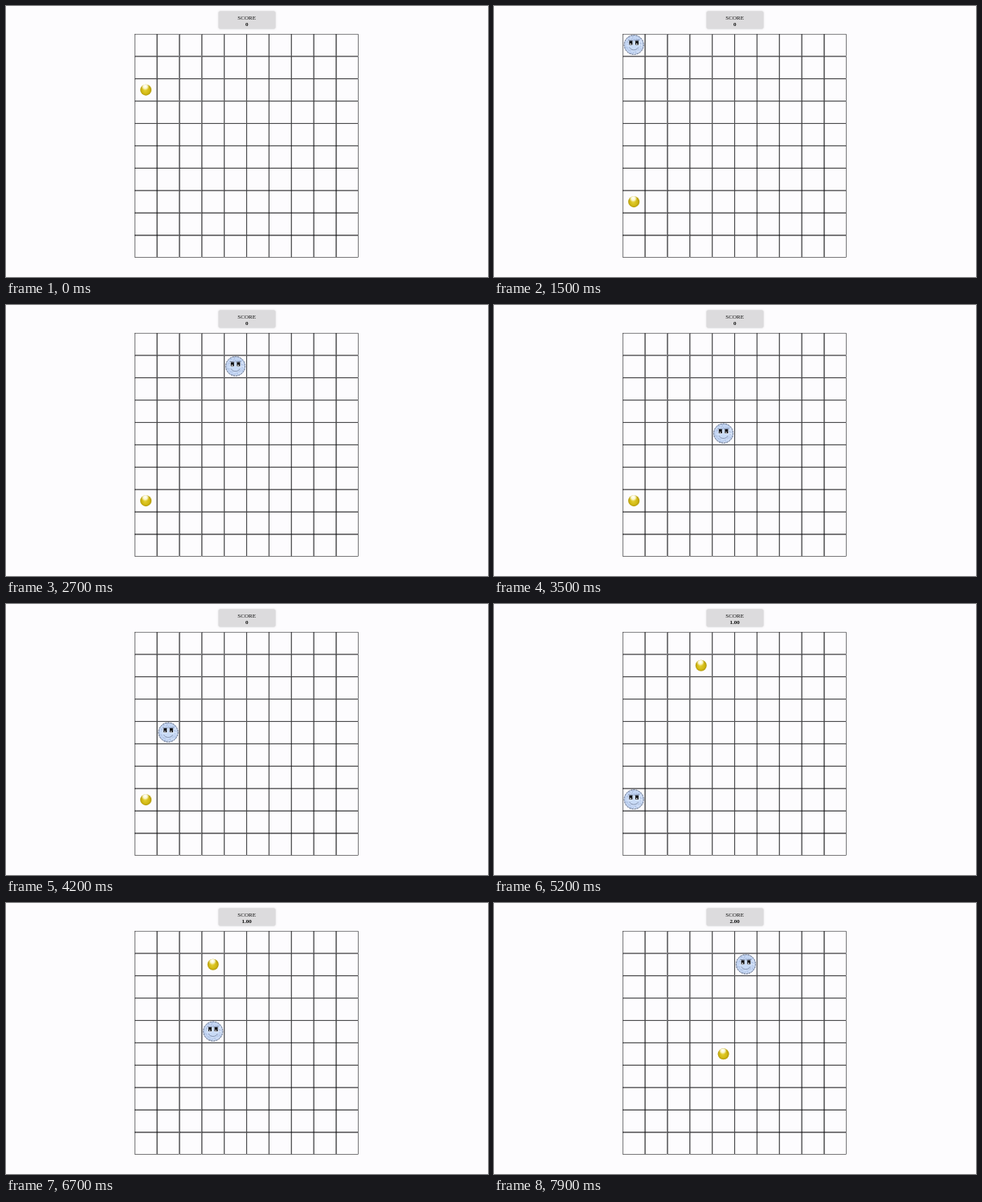
Animation of 600 by 338 pixels, one loop 8000 ms. Source, as an HTML page with a canvas:

```html
<!DOCTYPE html>
<html lang="en">
<head>
<meta charset="utf-8">
<title>Grid game</title>
<style>
  html, body { margin: 0; width: 100%; height: 100%; overflow: hidden; background: #fdfcfe; }
  canvas { display: block; width: 600px; height: 338px; }
</style>
</head>
<body>
<canvas id="stage" width="600" height="338"></canvas>
<script>
const ctx = document.getElementById('stage').getContext('2d');
const LOOP = 8000, COUNT = 10, RELOAD = 1500;
const LEFT = 160.2, TOP = 34.9, CELL_W = 27.87, CELL_H = 27.9;

// One letter per hop: right, down, left, up.
const PATH = 'RRRRDDDDLLLLDDDRRRUUUUUURR';
const HOPS = [1700, 1900, 2200, 2400, 2700, 2900, 3200, 3400, 3700, 3900, 4200, 4500, 4700,
  5000, 5200, 5500, 5700, 5900, 6200, 6400, 6700, 6900, 7200, 7400, 7700, 7900];
const STEP = { R: [1, 0], D: [0, 1], L: [-1, 0], U: [0, -1] };
const ROUNDS = [
  { from: 0, ball: [0, 2], score: '0' },
  { from: RELOAD, ball: [0, 7], score: '0' },
  { from: 5200, ball: [3, 1], score: '1.00' },
  { from: 7400, ball: [4, 5], score: '2.00' }
];
const POINTER = { from: 400, to: 1000, a: [199, 103], b: [61, 0] };

const center = ([c, r]) => [LEFT + (c + 0.5) * CELL_W, TOP + (r + 0.5) * CELL_H];

function disc(x, y, r, fill) {
  ctx.fillStyle = fill;
  ctx.beginPath();
  ctx.arc(x, y, r, 0, Math.PI * 2);
  ctx.fill();
}

function stroke(color, width, trace) {
  ctx.strokeStyle = color;
  ctx.lineWidth = width;
  ctx.beginPath();
  trace();
  ctx.stroke();
}

function random(seed) {
  return () => (seed = (seed * 16807) % 2147483647) / 2147483647;
}

// Neighbouring cell borders touch, so inner lines are twice as thick as the frame.
function drawGrid() {
  const border = 0.55;
  ctx.strokeStyle = '#101012';
  ctx.lineWidth = border;
  for (let r = 0; r < COUNT; r++) {
    for (let c = 0; c < COUNT; c++) {
      ctx.strokeRect(LEFT + c * CELL_W + border / 2, TOP + r * CELL_H + border / 2,
        CELL_W - border, CELL_H - border);
    }
  }
}

function drawScore(score) {
  ctx.save();
  ctx.shadowColor = 'rgba(0,0,0,.16)';
  ctx.shadowBlur = 2;
  ctx.fillStyle = '#dcdbdd';
  ctx.beginPath();
  ctx.roundRect(264.5, 6.5, 71, 22, 2);
  ctx.fill();
  ctx.restore();
  ctx.fillStyle = '#111';
  ctx.textAlign = 'center';
  ctx.font = '7.1px "Liberation Serif", serif';
  ctx.fillText('SCORE', 299.7, 17.3);
  ctx.font = 'bold 7.1px "Liberation Serif", serif';
  ctx.fillText(score, 299.7, 25.2);
}

function drawBall([x, y]) {
  const body = ctx.createRadialGradient(x - 1, y + 1, 0.5, x, y, 7);
  body.addColorStop(0, '#e0cb2c');
  body.addColorStop(0.6, '#d3ba14');
  body.addColorStop(1, '#b39a0a');
  disc(x, y, 7, body);
  const shine = ctx.createRadialGradient(x - 0.8, y - 4.6, 0.5, x - 0.8, y - 4, 5);
  shine.addColorStop(0, 'rgba(255,255,250,1)');
  shine.addColorStop(0.5, 'rgba(255,253,225,.85)');
  shine.addColorStop(1, 'rgba(250,240,150,0)');
  disc(x, y, 7.1, shine);
}

function drawFace([x, y]) {
  const rnd = random(77);
  ctx.save();
  ctx.translate(x, y - 0.4);
  disc(0, 0, 12.2, '#c3d5f3');
  for (let i = 0; i < 70; i++) {
    const a = rnd() * Math.PI * 2, r = 6 + rnd() * 5.5;
    const tone = rnd() < 0.5 ? 'rgba(228,238,253,.7)' : 'rgba(140,162,203,.45)';
    disc(Math.cos(a) * r, Math.sin(a) * r, 0.5 + rnd() * 0.6, tone);
  }
  disc(0, 1.5, 7, 'rgba(203,220,247,.75)');
  stroke('#a3afc6', 0.9, () => ctx.arc(0, 0, 12, 0, Math.PI * 2));
  ctx.setLineDash([1.6, 1.7]);
  stroke('#667085', 1, () => ctx.arc(0, 0, 12.1, 0, Math.PI * 2));
  ctx.setLineDash([]);
  for (const side of [-1, 1]) {
    const ex = side * 3.8;
    stroke('#68748c', 0.8, () => {
      ctx.moveTo(ex - 3.2, -5.6 + side * 0.3);
      ctx.lineTo(ex + 3, -5.6 - side * 0.3);
    });
    ctx.fillStyle = '#f4f8ff';
    ctx.fillRect(ex - 2.4, -4.8, 4.8, 5.4);
    ctx.fillStyle = '#0b0c10';
    ctx.fillRect(ex - 2, -5, 4, 5);
    ctx.fillStyle = '#fff';
    ctx.fillRect(ex - 1, -1.9, 1.4, 1.5);
  }
  stroke('#7785a0', 0.8, () => ctx.arc(0, 0, 6.4, 0.5, Math.PI - 0.5));
  ctx.restore();
}

function drawPointer(t) {
  const { from, to, a, b } = POINTER;
  if (t < from || t >= to) return;
  const k = Math.min(1, (t - from) / (to - from - 100));
  const e = k * k * (3 - 2 * k);
  ctx.save();
  ctx.translate(a[0] + (b[0] - a[0]) * e, a[1] + (b[1] - a[1]) * e);
  ctx.beginPath();
  [[0, 0], [0, 7.4], [1.8, 5.8], [3, 8.6], [4.2, 8.1], [3, 5.4], [5.4, 5.4]]
    .forEach(p => ctx.lineTo(...p));
  ctx.closePath();
  ctx.fillStyle = '#fff';
  ctx.fill();
  ctx.strokeStyle = '#222';
  ctx.lineWidth = 0.7;
  ctx.stroke();
  ctx.restore();
}

function faceCell(t) {
  const cell = [0, 0];
  HOPS.forEach((time, i) => {
    if (t < time) return;
    const [dx, dy] = STEP[PATH[i]];
    cell[0] += dx;
    cell[1] += dy;
  });
  return cell;
}

function draw(t) {
  const round = ROUNDS.filter(r => t >= r.from).pop();
  ctx.fillStyle = '#fdfcfe';
  ctx.fillRect(0, 0, 600, 338);
  drawGrid();
  drawScore(round.score);
  drawBall(center(round.ball));
  if (t >= RELOAD) drawFace(center(faceCell(t)));
  drawPointer(t);
}

const start = performance.now();
function tick() {
  draw((performance.now() - start) % LOOP);
  requestAnimationFrame(tick);
}
tick();
</script>
</body>
</html>
```
